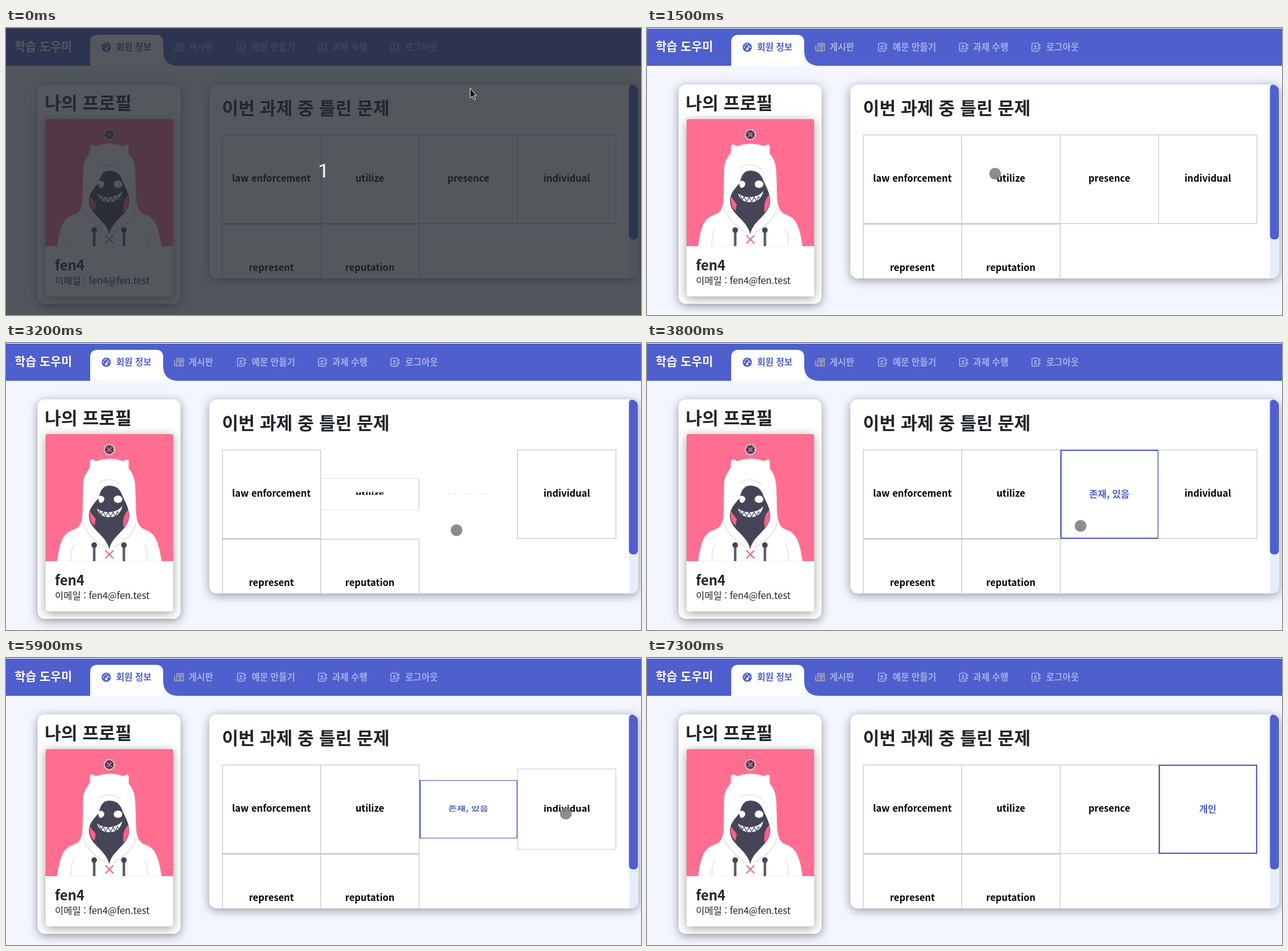
Recreate the animation shown at these times as an HTML page. Size 1026 by 463 pixels, loop 7600 ms.

```html
<!DOCTYPE html>
<html lang="ko">
<head>
<meta charset="utf-8">
<style>
  html, body { margin: 0; height: 100%; overflow: hidden; background: #f3f6ff; }
  svg { display: block; width: 100vw; height: 100vh; }
  text { font-family: "Noto Sans CJK KR", "Noto Sans CJK", "Noto Sans CJK JP", sans-serif; font-weight: 700; }
  .heading { font-size: 28.8px; fill: #212529; }
  .nav { font-size: 14.4px; fill: #a7afe6; }
  .panel { fill: #fff; filter: drop-shadow(0 3px 8px rgba(0, 0, 0, .38)); }
  .card text { text-anchor: middle; font-size: 15.2px; }
  .card rect { fill: #fff; stroke: #c2c2c9; shape-rendering: crispEdges; }
  .card .back text { fill: #4f5fce; }
  .card .back rect { stroke: #4f5fce; stroke-width: 2; }
</style>
</head>
<body>
<svg id="stage" viewBox="0 0 1026 463" preserveAspectRatio="none">
  <defs>
    <clipPath id="panelClip"><rect x="328.5" y="91" width="693" height="313" rx="12"/></clipPath>
    <clipPath id="photoClip"><path d="M64 352V150q0-3 3-3H267q3 0 3 3V352z"/></clipPath>
    <g id="book" fill="none" stroke="#a7afe6" stroke-width="1.6">
      <rect x="-6" y="-6.5" width="11" height="13" rx="2"/>
      <path d="M7-5v3M7 0v3M-3.5 4q3-4 6 0"/>
      <circle cx="-.5" cy="-1.5" r="1.3"/>
    </g>
  </defs>

  <rect width="1026" height="463" fill="#f3f6ff"/>
  <path d="M0 1H1026V61H278Q254 60 254 37H136V61H0z" fill="#4f5fce"/>
  <path d="M136 61V23q0-12 12-12h94q12 0 12 12v38z" fill="#fff"/>
  <text x="14" y="37" font-size="19" fill="#fff">학습 도우미</text>
  <g id="nav"></g>

  <g transform="translate(162 31)">
    <circle r="7.5" fill="#4f5fce"/>
    <path d="M0 3L3-3" stroke="#fff" stroke-width="1.5"/>
    <g fill="#fff"><circle cy="3" r="2"/><circle cx="-4.5" r="1"/><circle cx="-3" cy="-3.5" r="1"/><circle cy="-5" r="1"/><circle cx="4.7" r="1"/></g>
  </g>
  <g transform="translate(280 31)" fill="none" stroke="#aaa6b0" stroke-width="1.6">
    <path d="M-4-6H6.5V6H-5.5Q-7.5 6-7.5 4V-3M-4-6V4q0 2-1.5 2M-1 1.5H4M-1 4H4"/>
    <rect x="-1" y="-3.5" width="5" height="2.5"/>
  </g>
  <use href="#book" x="380" y="31"/><use href="#book" x="511" y="31"/><use href="#book" x="628" y="31"/>

  <rect class="panel" x="51" y="91" width="231" height="354" rx="12"/>
  <text class="heading" x="62.5" y="132">나의 프로필</text>
  <rect class="panel" x="64" y="147" width="206" height="286" rx="4"/>
  <g clip-path="url(#photoClip)">
    <rect x="64" y="147" width="206" height="205" fill="#ff6e91"/>
    <path d="M83 352C87 325 91 307 108 302Q124 298 124 275L125 225C126 212 134 206 136 200L136 190Q139 186 145 191Q167 183 190 191Q196 186 198 190V203C207 212 209 225 209 245L210 275Q211 298 226 302C242 307 247 325 251 352z" fill="#fff" stroke="#f1e3e8"/>
    <path d="M124 290Q130 310 160 330M210 290Q206 312 174 330M105 352Q104 336 110 325M228 352Q230 336 224 325M150 226Q167 214 185 228" fill="none" stroke="#e3e1e6" stroke-width="1.5"/>
    <path d="M167 230C156 230 152 239 150 250C139 262 134 269 134 279C135 302 161 308 167 333C171 309 200 302 199 277C198 263 190 252 186 241Q180 230 167 230z" fill="#464457"/>
    <path d="M135 271L145 284L143 295Q134 288 135 271M198 269Q187 279 190 298Q201 288 198 269" fill="#ff6088"/>
    <path d="M150 247Q157 245 159 251Q158 258 152 258Q148 255 150 247" fill="#fff"/>
    <ellipse cx="181" cy="252" rx="7" ry="6" fill="#fff"/>
    <path d="M147 267Q155 273 167 273Q181 272 188 263Q184 281 167 281Q151 281 147 267z" fill="#fff"/>
    <path d="M150 270l4 7l3-5l4 8l4-7l4 8l4-8l4 7l3-8l4 5" fill="none" stroke="#464457" stroke-width="1.2"/>
    <path d="M142.5 327V352M190.5 327V352" stroke="#5a5863" stroke-width="4"/>
    <g fill="#464457"><circle cx="142.5" cy="326" r="4.5"/><circle cx="190.5" cy="326" r="4.5"/></g>
    <path d="M161 335l12 12M173 335l-12 12" stroke="#f06a88" stroke-width="2" stroke-linecap="round"/>
    <circle cx="167" cy="172" r="8" fill="#464457" stroke="#eddce3" stroke-width="2" stroke-dasharray="3 1"/>
    <path d="M163.5 168.5l7 7M170.5 168.5l-7 7" stroke="#ff6e91" stroke-width="1.7"/>
  </g>
  <text x="79" y="391" font-size="22" fill="#212529">fen4</text>
  <text x="79" y="413" font-size="15.2" fill="#212529" style="font-weight:400">이메일 : fen4@fen.test</text>

  <rect class="panel" x="328.5" y="91" width="693" height="313" rx="12"/>
  <g clip-path="url(#panelClip)">
    <text class="heading" x="349" y="140">이번 과제 중 틀린 문제</text>
    <g id="cards"></g>
    <rect x="1006.5" y="91" width="15" height="313" fill="#e6edfd"/>
    <rect x="1006.5" y="91" width="14.5" height="250" rx="6" fill="#4f5fce"/>
  </g>
  <circle id="pointer" r="9.5" fill="#7f7f7f" opacity=".9"/>
  <g id="countdown">
    <rect width="1026" height="463" fill="rgb(36,40,47)" opacity=".78"/>
    <text x="513" y="241" text-anchor="middle" fill="#fff" style="font:32px Roboto,sans-serif">1</text>
    <path d="M750 97V113L753.5 110L756 115.5L758.5 114.5L756 109H760z" fill="#111" stroke="#fff"/>
  </g>
</svg>
<script>
const LOOP = 7600, STEP = 100, FLIP = 600;
const byId = id => document.getElementById(id);

const tabs = [['회원 정보', 178], ['게시판', 295], ['예문 만들기', 397], ['과제 수행', 527], ['로그아웃', 645]];
byId('nav').innerHTML = tabs.map(([label, x], i) =>
  `<text class="nav" x="${x}" y="36"${i ? '' : ' style="fill:#4f5fce"'}>${label}</text>`).join('');

// word, meaning, time it turns over, time it turns back
const words = [
  ['law enforcement'],
  ['utilize', '활용하다', 1725, 2986],
  ['presence', '존재, 있음', 3025, 5786],
  ['individual', '개인', 5825, Infinity],
  ['represent'],
  ['reputation']
];
const face = (name, label, w, h, y) =>
  `<g class="${name}"><rect x="${-w / 2}" y="${-h / 2}" width="${w}" height="${h}"/><text y="${y}">${label}</text></g>`;
byId('cards').innerHTML = words.map(([word, meaning = '']) =>
  `<g class="card">${face('front', word, 158.6, 143, 4)}${face('back', meaning, 157, 142, 5)}</g>`).join('');
const cards = [...document.querySelectorAll('.card')];

// time, x, y
const path = [
  [100, 675, 100], [600, 303, 200], [800, 303, 200], [1500, 562.5, 235], [1700, 562.5, 235],
  [2400, 722.5, 311], [2500, 726, 309], [2800, 732, 292], [3000, 732, 292], [3400, 724, 312],
  [3800, 700.5, 295], [4100, 509, 201], [4300, 509, 201], [4700, 794, 255], [5100, 655, 310],
  [5300, 668, 336], [5700, 905, 250], [5900, 904.5, 251], [6600, 509, 148], [6700, 515, 142],
  [7300, 124, -12], [7600, 124, -12]
];

function pointerAt(t) {
  const i = Math.max(1, path.findIndex(p => p[0] >= t));
  const [t0, x0, y0] = path[i - 1], [t1, x1, y1] = path[i];
  const k = (t - t0) / (t1 - t0);
  return [x0 + (x1 - x0) * k, y0 + (y1 - y0) * k];
}

// CSS "ease" curve, solved by bisection
function ease(x) {
  if (x <= 0) return 0;
  if (x >= 1) return 1;
  let s = .5;
  for (let d = .25; d > 1e-4; d /= 2) s += .75 * s * (1 - s) + s ** 3 < x ? d : -d;
  return .3 * s * (1 - s) ** 2 + 3 * s * s * (1 - s) + s ** 3;
}

function draw(t) {
  byId('countdown').style.display = t < 100 ? '' : 'none';
  const pointer = byId('pointer'), [x, y] = pointerAt(t);
  pointer.style.display = t < 100 ? 'none' : '';
  pointer.setAttribute('cx', x);
  pointer.setAttribute('cy', y);
  words.forEach(([, , over = Infinity, back = Infinity], i) => {
    const turn = Math.cos(Math.PI * (ease((t - over) / FLIP) - ease((t - back) / FLIP)));
    const [front, rear] = cards[i].children;
    front.style.display = turn >= 0 ? '' : 'none';
    rear.style.display = turn < 0 ? '' : 'none';
    cards[i].setAttribute('transform',
      `translate(${428.8 + 159.1 * (i % 4)} ${i < 4 ? 244 : 388}) scale(1 ${Math.abs(turn)})`);
  });
}

const start = performance.now();
function tick() {
  const t = (performance.now() - start) % LOOP;
  draw(Math.floor(t / STEP) * STEP);
  requestAnimationFrame(tick);
}
tick();
</script>
</body>
</html>
```
